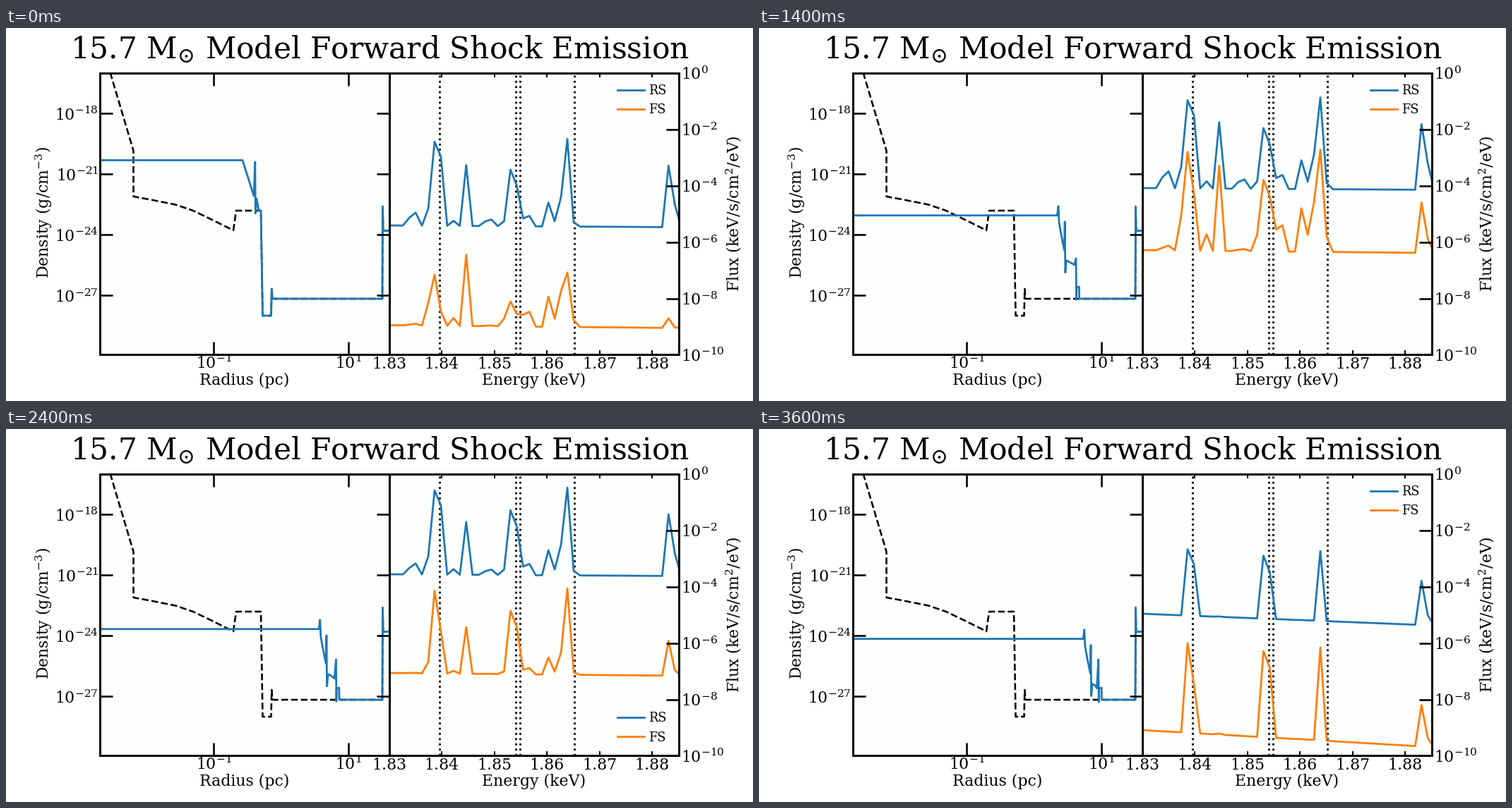
Recreate the animation shown at these times as a matplotlib script. Size 1058 px wide and 529 px high, loop 3800 ms.

```python
import numpy as np
import matplotlib.pyplot as plt
from matplotlib.animation import FuncAnimation
from matplotlib.patches import Rectangle

W, H, DPI = 1058, 529, 100
FRAMES, INTERVAL = 19, 200
BLUE, ORANGE = "#1f77b4", "#ff7f0e"
LEFT, MID, RIGHT, TOP, BOTTOM = 132.5, 542.5, 952.5, 63.5, 463
DECADE = 40  # pixels per decade of flux

plt.rcParams["font.family"] = "DejaVu Serif"
plt.rcParams["mathtext.fontset"] = "dejavuserif"


def pt(px):
    return px * 72 / DPI


fig = plt.figure(figsize=(W / DPI, H / DPI), dpi=DPI, facecolor="white")
ax = fig.add_axes([0, 0, 1, 1])
ax.set_xlim(0, W)
ax.set_ylim(H, 0)
ax.axis("off")


def panel(x0, x1):
    area = (x0, TOP), x1 - x0, BOTTOM - TOP
    ax.add_patch(Rectangle(*area, fill=False, ec="black", lw=pt(3), zorder=6))
    return ax.add_patch(Rectangle(*area, fc="#fdfffc", ec="none", zorder=0))


def stroke(xs, ys, color="black", width=2.8, z=3, clip=None, **kw):
    line, = ax.plot(xs, ys, color=color, lw=pt(width), zorder=z, **kw)
    if clip is not None:
        line.set_clip_path(clip)
    return line


def label(x, y, text, px=22, ha="center", va="baseline", **kw):
    return ax.text(x, y, text, fontsize=pt(px), ha=ha, va=va, zorder=7, **kw)


def power_label(x, y, power, **kw):
    label(x, y, f"$\\mathdefault{{10^{{{power}}}}}$", **kw)


def tick(x, y, dx, dy, width=2.6):
    stroke([x, x + dx], [y, y + dy], width=width, z=5, solid_capstyle="butt")


left_box, right_box = panel(LEFT, MID), panel(MID, RIGHT)

# Ticks and labels
for i in range(4):
    y = 121 + 86.1 * i
    tick(LEFT, y, 18, 0)
    tick(MID, y, -18, 0)
    power_label(131, y, -18 - 3 * i, ha="right", va="center_baseline")

for x, power in ((294, -1), (485, 1)):
    tick(x, BOTTOM, 0, -18)
    tick(x, TOP, 0, 18)
    power_label(x, 483, power)

for i in range(6):
    y = TOP + 2 * DECADE * i
    if 0 < i < 5:
        tick(RIGHT, y, -18, 0)
    power_label(956, y, -2 * i, ha="left", va="center_baseline")
    x = MID + 74.5 * i
    if i:
        tick(x, BOTTOM, 0, -6, 2)
        tick(x, TOP, 0, 6, 2)
    label(x, 483, f"{1.83 + i / 100:.2f}")

label(529.5, 43, r"15.7 M$_{\odot}$ Model Forward Shock Emission", 42.4)
label(337.5, 506, "Radius (pc)")
label(747.5, 506, "Energy (keV)")
label(61, 262, "Density (g/cm$^{-3}$)", rotation=90, rotation_mode="anchor")
label(1038, 263, "Flux (keV/s/cm$^2$/eV)", rotation=90, rotation_mode="anchor")

for x in (614, 721.5, 728, 804.5):
    stroke([x, x], [BOTTOM, TOP], z=2, ls=":")

# Density: undisturbed surroundings, and the blast wave running into them
FLOOR = 384
WIND = [(147.5, 63), (180.5, 174), (180.5, 239), (205, 243.5), (240, 250.5),
        (265, 259), (295, 273.5), (322, 287), (326, 259)]
SHELL = [(361, 259), (363.5, 408), (375.5, 408), (376.3, 370), (377.5, FLOOR)]
EDGE = [(533, FLOOR), (533.5, 253), (534.2, 287.5), (543, 287.5)]
START = [(LEFT, 187.5), (335, 187.5), (351, 238), (352.8, 190), (353.3, 263),
         (355, 242), (358, 259)]
# Shocked layers, relative to the front of the flat inner region
LAYERS = [(0, 0), (1.6, -13), (2.6, 10), (5, 24), (10, 49), (10.8, 9),
          (11.4, 81), (13, 64), (17, 66)]

stroke(*zip(*WIND, *SHELL, *EDGE), width=2.6, z=2.5, clip=left_box, ls="--")


def density(i):
    if i == 0:
        return START + SHELL + EDGE
    travel = 95.5 * np.log10((i + 0.7) / 3.7)
    front, level = 392 + travel, 239.5 + 0.865 * travel
    end = front + 34.5 - 0.46 * i
    pts = [(LEFT, level)] + [(front + dx, level + dy) for dx, dy in LAYERS]
    if i < 6:
        pts += [(end - 12, level + 68), (end - 6, level + 112)]
    else:
        pts += [(end - 7, level + 70), (end - 4.7, 327)]
    pts += [(end - 4.2, FLOOR + 0.18 * i), (end - 3.8, 368), (end - 0.3, 367), (end, FLOOR)]
    return pts + EDGE


# Spectra: lines on a sloping continuum. Each group holds energy bin: strength,
# the extra strength in the forward shock, the late drift, and whether it is a metal.
GROUPS = [
    ({0: 126, 21: 131}, 17, -8, False),
    ({12: 87, 13: 64}, 17, 26, False),
    ({1: 105, 37: 94, 38: 36}, -20, -8, False),
    ({5: 88}, 19, -40, True),
    ({-1: 21, 3: -10, 11: -10, 14: 0, 15: 7, 18: 33, 19: -9, 20: 42, 22: -13}, 14, 0, True),
    ({-4: 0, -3: 13, 8: -12, 9: -4}, -40, -20, True),
]
FIRST_BIN = -8
BIN_X = 607 + 8.955 * np.arange(FIRST_BIN, 40)
SLOPE_X = (BIN_X - MID) / (RIGHT - MID)

# Continuum height and line strengths at a few key steps
STEPS = [0, 2, 3, 5, 7, 9, 10, 12, 14, 18]
REVERSE = dict(
    level=[280, 283, 264.5, 252.5, 227, 212, 206, 206, 217, 262],
    main=[-7, -3, -2, -3, -1, 0, -1, -4, -16, -24],
    metal=[-2, -1, -1, 14, 6, 0, 0, 0, -5, -110],
    slope=(2.5, 14), forward=0)
FORWARD = dict(
    level=[421.5, 407, 368.5, 335, 315, 298.5, 301, 346, 370, 427],
    main=[-71, -52, -42, -6, -3, 0, -7, -23, -47, -8],
    metal=[-6, 8, 14, 28, 14, 0, -8, -28, -80, -110],
    slope=(4, 20), forward=1)


def ramp(i, start, end):
    return np.clip((i - start) / (end - start), 0, 1)


def spectrum(shock, i):
    level, main, metal = (np.interp(i, STEPS, shock[k]) for k in ("level", "main", "metal"))
    flux = np.ones_like(BIN_X)
    for lines, extra, drift, is_metal in GROUPS:
        gain = (metal if is_metal else main) + extra * shock["forward"] + drift * ramp(i, 9, 18)
        for k, strength in lines.items():
            flux[k - FIRST_BIN] += 10 ** ((strength + gain) / DECADE)
    tilt, cooling = shock["slope"]
    continuum = level + (tilt + cooling * ramp(i, 14, 18)) * SLOPE_X
    return continuum - DECADE * np.log10(flux)


density_line = stroke([], [], BLUE, clip=left_box)
curves = [(shock, stroke(BIN_X, spectrum(shock, 0), color, clip=right_box))
          for shock, color in ((REVERSE, BLUE), (FORWARD, ORANGE))]

legend = []
for name, color, y in (("RS", BLUE, 87.5), ("FS", ORANGE, 114.8)):
    key = stroke([866, 904], [y, y], color, z=4)
    legend.append((key, label(910, y + 6.5, name, 17.6, ha="left"), y))


def draw(i):
    density_line.set_data(*zip(*density(i)))
    for shock, line in curves:
        line.set_ydata(spectrum(shock, i))
    # The legend sits below while the lines are high
    drop = 321.3 if 8 <= i < 14 else 0
    for key, text, y in legend:
        key.set_ydata([y + drop] * 2)
        text.set_y(y + drop + 6.5)


anim = FuncAnimation(fig, draw, frames=FRAMES, interval=INTERVAL, repeat=True,
                     repeat_delay=0, blit=False)
plt.show()
```
